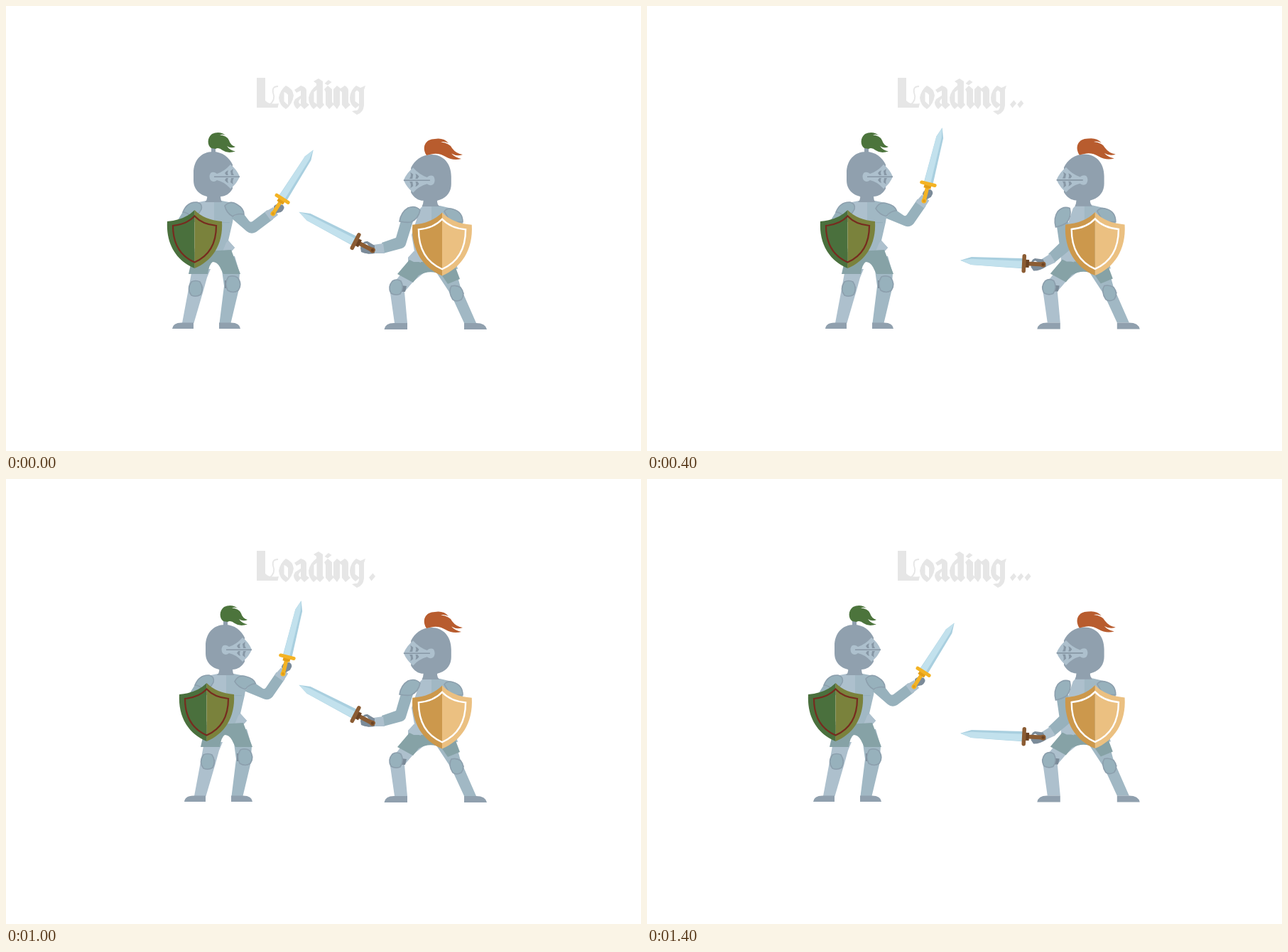
An HTML page for the animation above (1.6 s loop, 894 px wide and 626 px high).

```html
<!DOCTYPE html>
<html lang="en">
<head>
<meta charset="utf-8">
<title>Loading</title>
<style>
html, body { margin: 0; width: 100%; height: 100%; overflow: hidden; background: #fff; }
svg { display: block; width: 100%; height: 100%; }
.steel { fill: #90a0ae; }
.light { fill: #adc0cd; }
.mid { fill: #a1b8c4; }
.arm { fill: #97b1bc; }
.pad { fill: #97b1bc; stroke: #8c9fad; stroke-width: 1.6; }
.skirt { fill: #86a2a6; }
.dark { fill: #7b8b99; }
.green { --a: #4a703d; --b: #7a823c; --line: #772b1f; --hilt: #f4b324; --pommel: #e39e17; }
.gold { --a: #cc984c; --b: #ebc081; --line: #fff; --hilt: #8b5c33; --pommel: #6b4323; }
</style>
</head>
<body>
<svg viewBox="0 0 894 626" role="img" aria-label="Loading">
  <defs>
    <g id="helm">
      <path class="steel" d="M264 235C264 217 275 205 291 205C305 205 314 213 319 223V257C315 264 309 268 302 268Q302 272 304 276H280Q284 272 283 268C271 265 264 257 264 245Z"/>
      <path class="light" d="M297 236Q307 233 316 223Q325 230 329 240Q325 250 316 257Q307 247 297 245Q292 249 288 245Q285 240 288 235Q292 232 297 236Z"/>
      <g fill="#8797a5">
        <path d="M308 235Q310 232 313 231Q311 235 313 238H310ZM316 232L320 229Q318 234 321 238H317ZM308 245Q310 248 313 249Q311 245 313 242H310ZM316 248L320 251Q318 246 321 242H317Z"/>
        <path d="M293 239.4H329V241H293Z"/>
      </g>
    </g>
    <g id="shield">
      <path fill="var(--a)" d="M265.5 287Q252 301 227 303C225 336 241 359 265.5 369Z"/>
      <path fill="var(--b)" d="M265.5 287Q279 301 304 303C306 336 290 359 265.5 369Z"/>
      <path fill="none" stroke="var(--line)" stroke-width="2.2" d="M265.5 295.5Q255 307 235 309C235 335 246 352 265.5 360.5C285 352 296 335 296 309Q276 307 265.5 295.5Z"/>
    </g>
    <!-- Swords point up from a pommel at 0,0 -->
    <g id="sword">
      <path fill="#a9cfdf" d="M0 -106L-5 -92L-6.5 -26H6.5L5 -92Z"/>
      <path fill="#c2e1ed" d="M0 -106L-5 -92L-6 -26H3L2.5 -92Z"/>
      <path fill="var(--hilt)" d="M-2.7 0V-22H2.7V0Z"/>
      <path fill="var(--pommel)" d="M-5 -24H5V-18H-5Z"/>
      <path stroke="var(--hilt)" stroke-width="5" stroke-linecap="round" d="M-9.5 -24.5H9.5"/>
      <circle fill="var(--hilt)" r="3.5"/>
      <circle fill="var(--pommel)" r="2"/>
    </g>
    <path id="dot" d="M511 138.5L516.5 132.5L520 137L514.5 143.5Z"/>
  </defs>

  <g fill="#e6e6e6" fill-rule="evenodd">
    <path d="M353 101H365V133Q370 139 384 137L382.5 143H353Z"/>
    <path fill="none" stroke="#e6e6e6" stroke-width="1.8" d="M383 113Q374 113 376 122Q380 132 371 139"/>
    <path d="M384 129Q386 118 394 112Q404 116 405 126Q403 139 394 145Q385 140 384 129ZM391.5 121V134Q394 137 397 139V125Q395 122 391.5 121Z"/>
    <path d="M406 118L415 112Q423 114 423 119V136L427 139L420 145L415 140L410 145Q402 138 407 131L415 126V119L409 122ZM415 130L412.500 133Q411 137 415 138Z"/>
    <path d="M426 129Q428 118 437 112V109L433 106L440 102L446 106V136L448 139L442 145L437.500 141L433 145Q426 139 426 129ZM433.500 121V135L437.500 138V118Z"/>
    <path d="M448 117L453 112L459 117V135L462 138L455 145L450 139V121ZM448.500 109L454 104L458.500 107L453 111.500Z"/>
    <path d="M461 117L466 112L471 116L477 112Q482 115 482 119V136L485 139L478 145L473 139V121L470 119V139L466 145L461 139Z"/>
    <path d="M484 129Q485 118 493 112L499 115L506 112L504 118V140Q503 150 494 153L487 148L491 147Q497 148 497 140L492 144Q484 139 484 129ZM491.500 121V134L497 138V121L494 118.500Z"/>
  </g>
  <g id="dots" fill="#e6e6e6">
    <use href="#dot"/><use href="#dot" x="10.3"/><use href="#dot" x="20.6"/>
  </g>

  <g id="left" class="green">
    <path class="steel" d="M289 198H295V208H289Z"/>
    <path fill="#4c743c" d="M289 200C283 196 283 185 290 180C296 177 304 177 309 182Q305 180 301 181.500Q311 182 314 189Q316 196 323 198Q317 201 311 197Q315 203 323 204.500Q312 208 305 203Q299 198 295 201Z"/>
    <path class="arm" d="M250 288L240 304H266V288Z"/>
    <path class="light" d="M266 277L281 274H294V350H262L268 335Z"/>
    <path class="mid" d="M293 274H304L319 277Q322 290 319 304L313 330L322 340L315 348H293Z"/>
    <path class="arm" d="M300 304H315V305.200H300Z"/>
    <path class="light" d="M310 333L313 330L322 340L315 347H304Z"/>
    <path class="mid" d="M296 352L322 352L329 376L327 402L316.500 446H300.500L307 394L304 372Z"/>
    <path class="light" d="M262 370H288L283 382L278 400L264.500 446H248L257 398Z"/>
    <path class="skirt" d="M264 346L317 343L330 377H306L301 367Q297 360 291 360Q286 363 284 377H257Z"/>
    <path class="dark" d="M273 394L277 395L275 404L271 403ZM308 386H312V397H308Z"/>
    <path class="pad" d="M261 388Q267 385 273 388Q279 397 274 406Q268 410 261 407Q254 398 261 388ZM313 381Q320 378 326 382Q333 391 327 400Q320 405 312 400Q307 390 313 381Z"/>
    <path class="steel" d="M234 454Q235 445.500 247 445.500H264V454ZM300 445.500H317Q329 445.500 330 454H300Z"/>
    <path class="pad" d="M249 290Q255 275 269 276Q277 278 275 286Q270 296 262 298Q256 290 249 290Z"/>
    <use href="#helm"/>
    <g id="leftArm">
      <path class="arm" d="M317 298L339 317Q345 322 352 318L376 300L368 287L347 303Q344 305 342 302L332 289Z"/>
      <path class="light" d="M364 290L376 283L383 294L373 302Z"/>
      <path class="dark" d="M377 282Q381 276 390 280Q394 285 387 290L378 292Z"/>
      <use href="#sword" transform="translate(376 292) rotate(32.3)"/>
      <path class="pad" d="M308 281Q316 273 325 279Q335 285 335 293Q326 291 319 296Q310 291 308 281Z"/>
    </g>
    <use href="#shield"/>
  </g>

  <g id="right" class="gold">
    <path class="arm" d="M625 292L643 305V330H620Z"/>
    <path class="light" d="M583 285L587 281H600V370H566V354L575 345L571 322Z"/>
    <path class="mid" d="M599 281H611L628 285V340L636 370H599Z"/>
    <path class="mid" d="M604 372L634 374L640 396L662 446H645L627 407Z"/>
    <path class="light" d="M560 372L590 374L574 387L561 402L565 446H547L540 397Z"/>
    <path class="skirt" d="M568 357L551 377L573 389L581 379Q597 370 613 378L622 391L639 384L630 360H574Z"/>
    <path class="light" d="M574 345L566 354L584 361V345Z"/>
    <path class="dark" d="M556 393L564 394L562 402L556 402ZM640 399L645 404L641 408Z"/>
    <path class="pad" d="M544 387Q550 383 556 387Q561 396 555 405Q548 408 542 404Q537 395 544 387ZM627 394Q634 392 640 396Q647 405 641 413Q634 417 629 413Q622 402 627 394Z"/>
    <path class="steel" d="M532.500 455Q534 446 546 446H565V455ZM645 446H662Q675 446 677 455H645Z"/>
    <path class="pad" d="M617 289Q621 283 630 286Q643 290 643 304L626 304Z"/>
    <use href="#helm" transform="translate(599 245) scale(-1.03 1.03) translate(-291 -240)"/>
    <path fill="#b85c2e" d="M592 210C585 199 590 187 604 187Q616 185 623 193Q617 190 612 191.500Q625 193 628 200Q634 208 643 209Q635 212 627 207.500Q632 213 641 215Q629 218 619 212Q609 206 599 208.500Q595 209 592 210Z"/>
    <g id="rightArm">
      <path class="arm" d="M556 302L549 326L529 333L531 348L557 341Q562 339 563 335L573 303Z"/>
      <path class="light" d="M517 336L531 334L533 348L519 348Z"/>
      <path class="dark" d="M499 340Q502 330 509 331L519 337V348Q508 350 500 346Z"/>
      <path fill="#fff" d="M502 335L508 334L511 338L504 337Z"/>
      <use href="#sword" transform="translate(516 343.5) rotate(-62.6) scale(1.1)"/>
      <path class="pad" d="M583 287Q576 280 566 284Q556 290 554 303Q563 305 570 304Q581 299 583 287Z"/>
    </g>
    <use href="#shield" transform="translate(614 290.5) scale(1.085) translate(-265.5 -287)"/>
  </g>
</svg>
<script>
const el = id => document.getElementById(id);
const dots = [...el('dots').children];
const pose = (id, value) => el(id).setAttribute('transform', value);

function draw() {
  const beat = Math.floor(performance.now() / 200) % 4;
  const advance = beat === 1 || beat === 2;
  const retreat = beat >= 2;
  pose('left', `translate(${advance ? 17 : 0} 0)`);
  pose('leftArm', `rotate(${advance ? -18.3 : 0} 318.6 292.3)`);
  pose('right', `translate(${retreat ? 16.8 : 0} ${retreat ? -0.4 : 0})`);
  pose('rightArm', `rotate(${retreat ? -24.5 : 0} 575.6 296.5)`);
  dots.forEach((dot, i) => dot.style.display = i < beat ? '' : 'none');
  requestAnimationFrame(draw);
}
draw();
</script>
</body>
</html>
```
